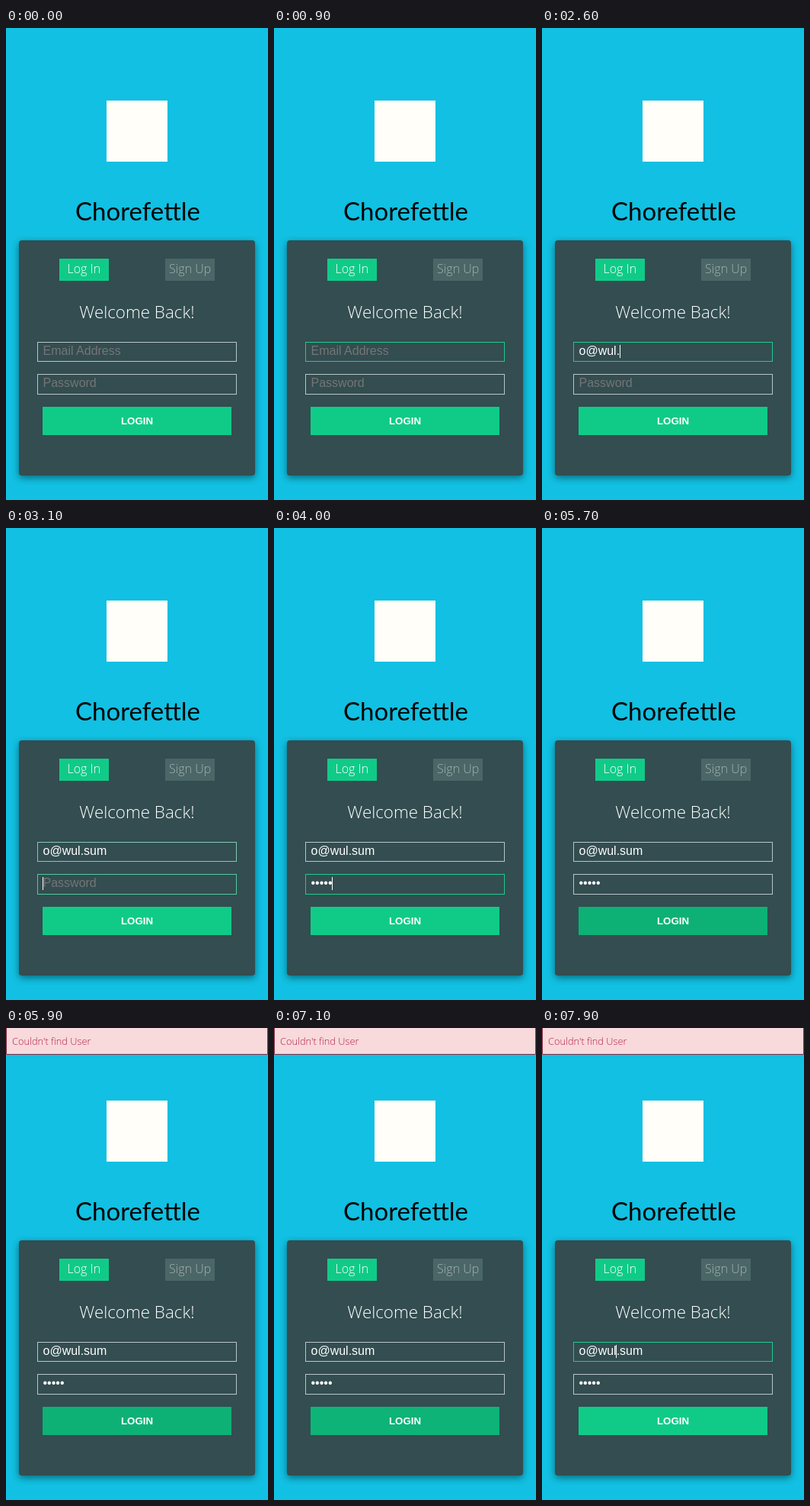
An HTML page for the animation above (8 s loop, 344x618 px).

```html
<!DOCTYPE html>
<html lang="en">
<head>
<meta charset="utf-8">
<title>Login form</title>
<style>
  html, body { margin: 0; width: 100%; height: 100%; overflow: hidden; background: #11c0e2; }
  svg { display: block; width: 344px; height: 618px; }
  text { fill: #fff; }
  .card { fill: #334d50; filter: drop-shadow(0 3px 5px rgba(0, 0, 0, .45)); }
  .thin { font: 300 16px "Open Sans", sans-serif; }
  .mid { text-anchor: middle; }
  .title { font: 400 33px Lato, sans-serif; fill: #000; }
  .welcome { font-size: 22.4px; }
  .field rect { fill: none; }
  .field text { font: 16px "Liberation Sans", Arial, sans-serif; }
  .field .hint { fill: #757575; }
  .field .caret { fill: #fff; }
  .login { font: bold 13.33px "Liberation Sans", Arial, sans-serif; }
  .alert text { font-size: 12.8px; fill: #b51f42; }
</style>
</head>
<body>
<svg viewBox="0 0 344 618">
  <rect width="344" height="618" fill="#11c0e2"/>
  <rect x="132" y="95" width="80" height="80" fill="#fffef9"/>
  <text class="title mid" x="173" y="252">Chorefettle</text>

  <rect class="card" x="17" y="278" width="310" height="308" rx="4"/>
  <rect x="70" y="302" width="65" height="29" fill="#10cb88"/>
  <text class="thin mid" x="102.3" y="321">Log In</text>
  <rect x="209" y="302" width="65" height="29" fill="#4b6667"/>
  <text class="thin mid" x="241.7" y="321" style="fill:#a2b0b0">Sign Up</text>
  <text class="thin welcome mid" x="172" y="380">Welcome Back!</text>

  <g class="field" id="email">
    <rect x="41.5" y="411.5" width="261" height="25"/>
    <text class="hint" x="48.5" y="428">Email Address</text>
    <text class="value" x="48.5" y="428"></text>
    <rect class="caret" y="415" width="1" height="17"/>
  </g>
  <g class="field" id="password">
    <rect x="41.5" y="453.5" width="261" height="26"/>
    <text class="hint" x="48.5" y="470">Password</text>
    <text class="value" x="48.5" y="470"></text>
    <rect class="caret" y="457" width="1" height="17"/>
  </g>

  <rect id="button" x="48" y="496" width="248" height="37"/>
  <text class="login mid" x="172" y="519">LOGIN</text>

  <g class="alert" id="alert">
    <rect width="344" height="35" fill="#f8d9dc"/>
    <path d="M.5 0V34.5H343.5V0" fill="none" stroke="#8c2843"/>
    <text class="thin" x="8" y="22">Couldn't find User</text>
  </g>
</svg>
<script>
const LOOP = 8000;
const $ = id => document.getElementById(id);
const IDLE = [184, 198, 199], FOCUS = [30, 203, 143];
const GREEN = [16, 203, 136], HOVER = [13, 177, 118];

const smooth = x => x * x * (3 - 2 * x);
const ramp = (t, from, to) => smooth(Math.min(1, Math.max(0, (t - from) / (to - from))));
const mix = (a, b, k) => `rgb(${a.map((v, i) => Math.round(v + (b[i] - v) * k))})`;
const within = (t, spans) => spans.some(([from, to]) => t >= from && t < to);

function makeField(id, content, keyTimes, caretSpans) {
  const [frame, hint, value, caret] = $(id).children;
  return (t, focus, caretAt) => {
    const count = keyTimes.filter(k => t >= k).length;
    const text = content.slice(0, count);
    if (value.textContent !== text) value.textContent = text;
    hint.style.display = count ? "none" : "";
    frame.style.stroke = mix(IDLE, FOCUS, focus);
    const at = Math.min(count, caretAt);
    const offset = at ? value.getSubStringLength(0, at) : 0;
    caret.setAttribute("x", Math.floor(48.5 + offset));
    caret.style.display = within(t, caretSpans) ? "" : "none";
  };
}

const email = makeField("email", "o@wul.sum",
  [1100, 1500, 2100, 2200, 2300, 2600, 2700, 2800, 2900],
  [[400, 900], [1100, 2000], [2100, 3000], [7400, LOOP]]);
const password = makeField("password", "•••••",
  [3400, 3500, 3600, 3800, 4000],
  [[3000, 4500], [5000, 5400]]);

function draw(t) {
  email(t, ramp(t, 340, 600) - ramp(t, 2940, 3200) + ramp(t, 7340, 7600),
    t < 7000 ? 9 : t < 7900 ? 4 : 5);
  password(t, ramp(t, 2940, 3200) - ramp(t, 5300, 5600), 5);
  $("button").style.fill = mix(GREEN, HOVER, ramp(t, 5300, 5700) - ramp(t, 7040, 7400));
  $("alert").style.display = t >= 5900 ? "" : "none";
}

let start;
function tick(now) {
  start ??= now;
  draw((now - start) % LOOP);
  requestAnimationFrame(tick);
}
draw(0);
requestAnimationFrame(tick);
</script>
</body>
</html>
```
